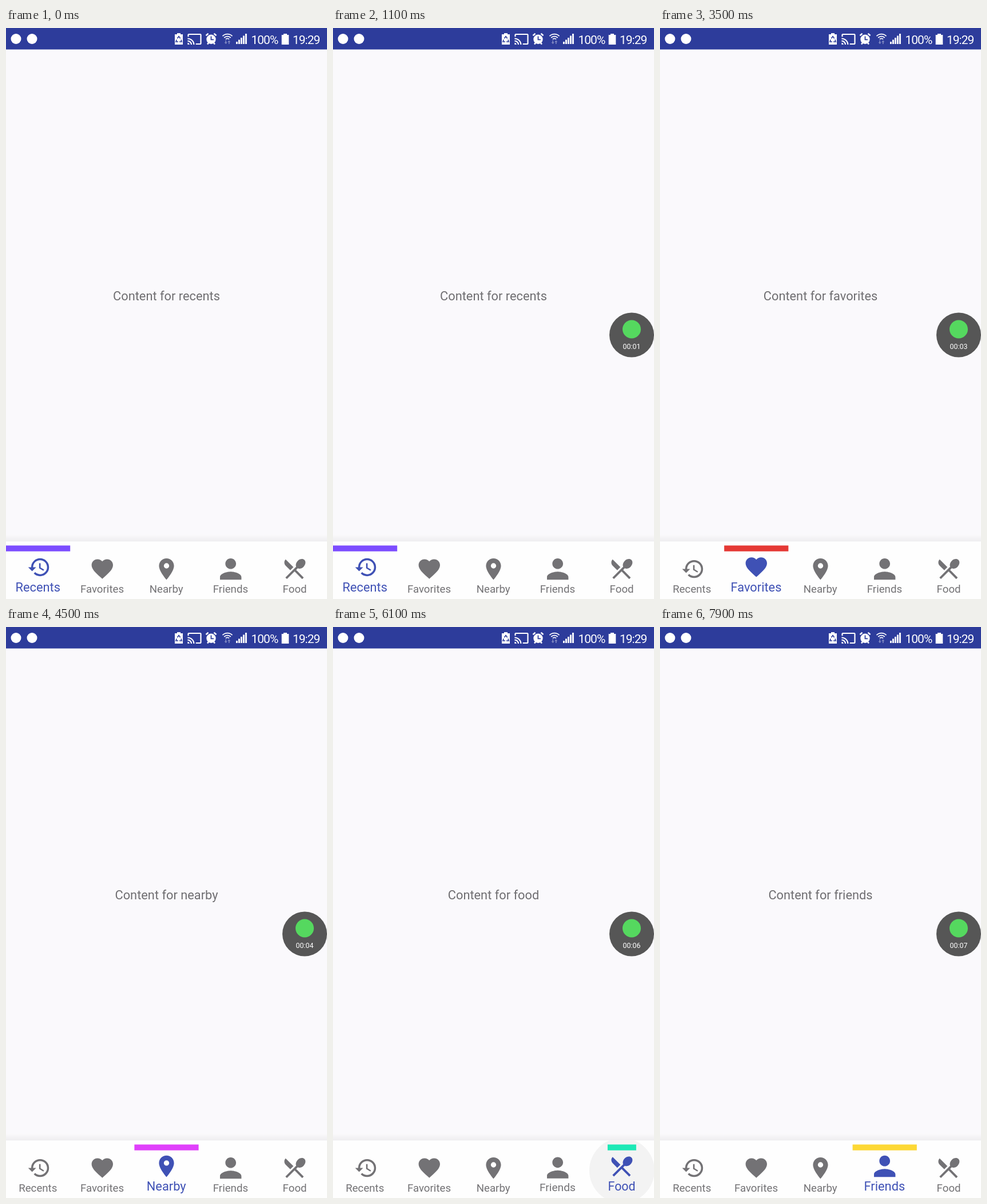
An HTML page that plays this animation: 561x998 px, repeating every 8000 ms.

```html
<!DOCTYPE html>
<html lang="en">
<head>
<meta charset="utf-8">
<title>Bottom navigation</title>
<style>
  html, body { margin: 0; width: 100%; height: 100%; overflow: hidden; background: #faf9fc; }
  svg { display: block; width: 100%; height: 100%; }
  text { font-family: Roboto, "Noto Sans", sans-serif; }
  .status { font-size: 21px; letter-spacing: -1px; fill: #fff; }
  .line { fill: none; stroke: #fff; }
  .cut { fill: none; stroke: #2d3c9b; }
</style>
</head>
<body>
<svg viewBox="0 0 561 998">
  <defs>
    <linearGradient id="shade" x2="0" y2="1">
      <stop offset="0" stop-color="#000" stop-opacity="0"/>
      <stop offset="1" stop-color="#000" stop-opacity=".05"/>
    </linearGradient>
    <clipPath id="navClip"><rect y="897.5" width="561" height="101"/></clipPath>
  </defs>
  <rect width="561" height="998" fill="#faf9fc"/>

  <!-- status bar -->
  <rect width="561" height="37.5" fill="#2d3c9b"/>
  <g fill="#fff">
    <circle cx="17.5" cy="19" r="9"/>
    <circle cx="45.5" cy="19" r="9"/>
    <path d="M299 9h6v2h4v18h-14V11h4z"/>
    <path class="cut" stroke-width="1.7" d="M299.4 18.2l2.6-3.6 2.6 3.6M306 20.4l1 3.6h-4M301 24h-4l1.2-3.6"/>
    <path transform="translate(329.5 19.5) scale(1.1 1.06) translate(-12 -12)" d="M1 18v3h3c0-1.66-1.34-3-3-3zm0-4v2c2.76 0 5 2.24 5 5h2c0-3.87-3.13-7-7-7zm0-4v2c4.97 0 9 4.03 9 9h2c0-6.08-4.93-11-11-11zM21 3H3c-1.1 0-2 .9-2 2v3h2V5h18v14h-7v2h7c1.1 0 2-.9 2-2V5c0-1.1-.9-2-2-2z"/>
    <circle cx="358.5" cy="19.8" r="8.2"/>
    <path class="line" stroke-width="2.6" d="M349.5 13.2l4-3.6M367.5 13.2l-4-3.6M352 28.5l2-2.5M365 28.5l-2-2.5"/>
    <path class="cut" stroke-width="1.8" d="M358.5 14.5v5.8h4.5"/>
    <path class="line" stroke-width="1.8" d="M378.5 14.2a12 12 0 0 1 17 0M381.3 17a8 8 0 0 1 11.4 0M384 19.6a4.2 4.2 0 0 1 6 0"/>
    <path id="traffic" d="M384.2 28l-2.6-3h1.8v-3.5h1.6V25h1.8zM389.8 21.5l2.6 3h-1.8V28H389v-3.5h-1.8z"/>
    <g id="signal"></g>
    <path d="M485 10h6v2h3.3v17h-12.6V12h3.3z"/>
  </g>
  <text class="status" x="428.5" y="27.6">100%</text>
  <text class="status" x="501" y="27.6">19:29</text>

  <text id="content" x="280.5" y="476" font-size="21.8" text-anchor="middle" fill="#6f6e71"></text>

  <!-- navigation -->
  <rect y="885" width="561" height="12.5" fill="url(#shade)"/>
  <rect y="897.5" width="561" height="101" fill="#fefefe"/>
  <g clip-path="url(#navClip)"><circle id="ripple" cy="950"/></g>
  <rect id="bar" y="904.5" height="10.2"/>
  <g id="nav"></g>

  <!-- timer bubble -->
  <g id="bubble">
    <circle cx="522" cy="536.5" r="39" fill="#565656"/>
    <circle cx="522" cy="526.5" r="16" fill="#55d85f"/>
    <text id="timer" x="522" y="561" font-size="12.4" text-anchor="middle" fill="#fff"></text>
  </g>
</svg>
<script>
const LOOP = 8000, STEP = 100, SLOT = 561 / 5;
const ACTIVE = '#3f51b5', IDLE = '#737275';

// mid: centre of the drawing in its own 24-unit grid
const tabs = [
  { name: 'Recents', color: '#7c4dff', scale: 1.74, mid: [11, 12],
    d: 'M13 3a9 9 0 0 0-9 9H1l3.89 3.89.07.14L9 12H6c0-3.87 3.13-7 7-7s7 3.13 7 7-3.13 7-7 7c-1.93 0-3.68-.79-4.94-2.06l-1.42 1.42A8.95 8.95 0 0 0 13 21a9 9 0 0 0 0-18zm-1 5v5l4.28 2.54.72-1.21-3.5-2.08V8z' },
  { name: 'Favorites', color: '#e53935', scale: 1.87, mid: [12, 12.2],
    d: 'M12 21.35l-1.45-1.32C5.4 15.36 2 12.28 2 8.5 2 5.42 4.42 3 7.5 3c1.74 0 3.41.81 4.5 2.09C13.09 3.81 14.76 3 16.5 3 19.58 3 22 5.42 22 8.5c0 3.78-3.4 6.86-8.55 11.54z' },
  { name: 'Nearby', color: '#e040fb', scale: 1.87, mid: [12, 12],
    d: 'M12 2C8.13 2 5 5.13 5 9c0 5.25 7 13 7 13s7-7.75 7-13c0-3.87-3.13-7-7-7zm0 9.5a2.5 2.5 0 0 1 0-5 2.5 2.5 0 0 1 0 5z' },
  { name: 'Friends', color: '#fdd835', scale: 2.34, mid: [12, 12],
    d: 'M12 12c2.21 0 4-1.79 4-4s-1.79-4-4-4-4 1.79-4 4 1.79 4 4 4zm0 2c-2.67 0-8 1.34-8 4v2h16v-2c0-2.66-5.33-4-8-4z' },
  { name: 'Food', color: '#1de9b6', scale: 1.93, mid: [12.3, 12.2],
    d: 'M8.1 13.34l2.83-2.83L3.91 3.5c-1.56 1.56-1.56 4.09 0 5.66zm6.78-1.81c1.53.71 3.68.21 5.27-1.38 1.91-1.91 2.28-4.65.81-6.12-1.46-1.46-4.2-1.1-6.12.81-1.59 1.59-2.09 3.74-1.38 5.27L3.7 19.87l1.41 1.41L12 14.41l6.88 6.88 1.41-1.41L13.41 13z' }
];

// [time of selection, tab]
const picks = [[-2000, 0], [2182, 1], [3830, 2], [4950, 3], [5914, 4], [7230, 3]];
const trafficOn = [[2000, 2700], [4700, 5200], [5500, 6000]];

const $ = id => document.getElementById(id);
const clamp = x => Math.min(1, Math.max(0, x));
const mix = (a, b, k) => a + (b - a) * k;
const easeOut = k => 1 - (1 - k) ** 2;
const easeInOut = k => (1 - Math.cos(Math.PI * k)) / 2;

function set(el, attrs) {
  for (const key in attrs) el.setAttribute(key, attrs[key]);
  return el;
}
function add(parent, tag, attrs) {
  const el = document.createElementNS('http://www.w3.org/2000/svg', tag);
  parent.appendChild(el);
  return set(el, attrs);
}

[4, 7.5, 11, 14.5, 18].forEach((h, i) =>
  add($('signal'), 'rect', { x: 402 + i * 4, y: 28 - h, width: 2.9, height: h }));

tabs.forEach((tab, i) => {
  tab.x = (i + 0.5) * SLOT;
  tab.icon = add($('nav'), 'path', { d: tab.d });
  tab.label = add($('nav'), 'text', { x: tab.x - 0.3, 'text-anchor': 'middle' });
  tab.label.textContent = tab.name;
});

function drawTab(tab, lift, color) {
  const [mx, my] = tab.mid;
  set(tab.icon, {
    fill: color,
    transform: `translate(${tab.x} ${mix(945.6, 942.5, lift)}) scale(${tab.scale}) translate(${-mx} ${-my})`
  });
  set(tab.label, { fill: color, y: mix(986.7, 985.2, lift), 'font-size': mix(18.7, 21.8, lift) });
}

function drawRipple(t) {
  const pick = picks.find(([at]) => t >= at - 250 && t < at + 420);
  if (!pick) return set($('ripple'), { r: 0 });
  const age = t - pick[0];
  set($('ripple'), {
    cx: tabs[pick[1]].x,
    r: mix(16, 57, easeOut(clamp((age + 250) / 420))),
    'fill-opacity': 0.042 * clamp((age + 300) / 150) * clamp((420 - age) / 180)
  });
}

function render(t) {
  let n = picks.length - 1;
  while (picks[n][0] > t) n--;
  const [at, current] = picks[n];
  const previous = n ? picks[n - 1][1] : -1;
  const settle = easeOut(clamp((t - at) / 300));

  tabs.forEach((tab, i) => {
    const lift = i === current ? settle : i === previous ? 1 - settle : 0;
    drawTab(tab, lift, i === current ? ACTIVE : IDLE);
  });

  const width = SLOT * easeInOut(clamp((t - at) / 400));
  set($('bar'), { x: tabs[current].x - width / 2, width, fill: tabs[current].color });
  drawRipple(t);

  $('content').textContent = 'Content for ' + tabs[current].name.toLowerCase();
  $('timer').textContent = '00:0' + Math.max(0, Math.floor((t - 100) / 1000));
  set($('bubble'), { opacity: clamp((t - 50) / 500) * (t >= 100) });
  set($('traffic'), { opacity: trafficOn.some(([a, b]) => t >= a && t < b) ? 1 : 0.4 });
}

const start = performance.now();
function tick() {
  const t = (performance.now() - start) % LOOP;
  render(Math.floor(t / STEP) * STEP);
  requestAnimationFrame(tick);
}
tick();
</script>
</body>
</html>
```
